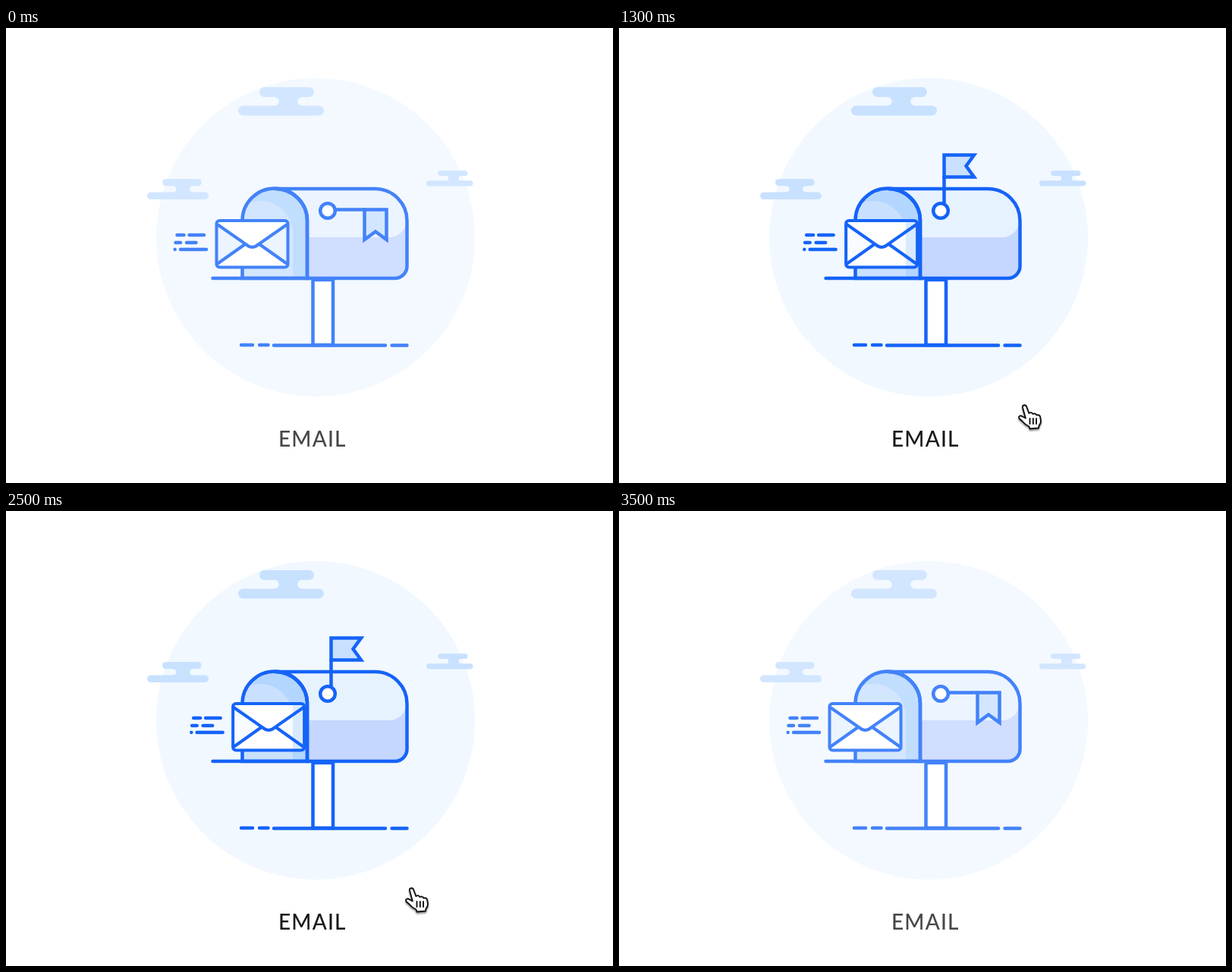
Animation of 800 by 600 pixels, one loop 3550 ms. Source, as an HTML page:

```html
<!DOCTYPE html>
<html lang="en">
<head>
<meta charset="utf-8">
<title>Email</title>
<style>
  html, body { margin: 0; width: 100%; height: 100%; overflow: hidden; background: #fff; }
  svg { display: block; width: 800px; height: 600px; }
  .line { fill: none; stroke: #1563f8; stroke-width: 4.5; }
  .round { stroke-linecap: round; }
  .thin { stroke-width: 4; }
  .cloud { fill: #c8e1ff; }
  .white { fill: #fff; }
  .tint { fill: #e7f2ff; }
  text { font: 500 28px Lato, sans-serif; letter-spacing: 1.2px; fill: #1a1a1a; }
  #cursor { filter: drop-shadow(0 2px 1px rgba(0, 0, 0, .45)); }
  #cursor path { fill: #fff; stroke: #111; stroke-width: 1.9; stroke-linejoin: round; stroke-linecap: round; }
</style>
</head>
<body>
<svg viewBox="0 0 800 600">
  <defs>
    <g id="cloud">
      <rect x="28" width="72" height="13" rx="6.5"/>
      <rect y="24.5" width="113" height="13" rx="6.5"/>
      <path d="M48 12.5V13a5.75 5.75 0 0 1 0 11.5v.5H84v-.5a5.75 5.75 0 0 1 0-11.5v-.5z"/>
    </g>
    <path id="door" d="M311.5 330V254a42.75 42.5 0 0 1 85.5 0V330z"/>
    <path id="body" d="M354 212H486.500a42 42 0 0 1 42 42V314a16 16 0 0 1 -16 16H397V254a43 42 0 0 0 -43-42z"/>
    <clipPath id="doorClip"><use href="#door"/></clipPath>
    <clipPath id="bodyClip"><use href="#body"/></clipPath>
  </defs>

  <g id="scene">
    <circle cx="408" cy="276" r="210" fill="#f1f8ff"/>
    <g class="cloud">
      <use href="#cloud" transform="translate(306 78)"/>
      <use href="#cloud" transform="translate(186 199) scale(.717)"/>
      <use href="#cloud" transform="translate(554 188) scale(.544)"/>
    </g>

    <!-- post and ground -->
    <path class="line round" d="M310 418H325M334 418H345.500M353 418.500H500M508.500 418.500H528.500"/>
    <rect class="line white" style="fill:#fff" x="404.500" y="332" width="26.500" height="86"/>

    <!-- mailbox -->
    <use href="#body" fill="#c5d7ff"/>
    <path class="tint" clip-path="url(#bodyClip)" d="M340 200H528V253a23 23 0 0 1 -23 23H340z"/>
    <use href="#door" fill="#b2d6ff"/>
    <circle cx="335" cy="271" r="43" fill="#c9e1ff" clip-path="url(#doorClip)"/>
    <rect x="311" y="271" width="67" height="59" fill="#c9e1ff"/>
    <use href="#body" class="line"/>
    <use href="#door" class="line"/>
    <path class="line round" d="M272.500 330H400"/>

    <!-- flag -->
    <g id="flag" class="line">
      <path d="M429 239.500H474"/>
      <path fill="#c9e1ff" d="M472.500 239.500H501.500V279L487 268.500L472.500 279z"/>
    </g>
    <circle class="line" style="fill:#fff" cx="424" cy="241" r="9.800"/>

    <!-- letter -->
    <g id="letter">
      <path class="line round" d="M225.500 273H234.500M241.500 273H261M223.500 283H230M238 283H250.500M222.700 292h.01M230 292H264"/>
      <rect class="white" x="277.500" y="254" width="94" height="61.500" rx="4"/>
      <path id="panes" class="tint" d="M279 260L315 285L279 311zM370.500 260L334.500 285L370.500 311z"/>
    </g>
    <rect id="shade" x="378" y="254" height="61.500" fill="#d9eaff"/>
    <g id="letterLines" class="line">
      <rect class="thin" x="277.500" y="254" width="94" height="61.500" rx="4"/>
      <path class="thin" d="M278.500 259L316 285Q324.500 293 333 285L370.500 259M278.500 311L314.500 285.500M370.500 311L334.500 285.500"/>
    </g>

    <text x="359" y="552">EMAIL</text>
  </g>

  <g id="cursor">
    <path d="M-3 3.500Q-3.500 .8-.8 .3Q1.500 .2 2.300 2.800L5.300 11Q8.500 8.800 10.500 12Q14 10.500 15.500 13.500Q19.500 12.300 20.300 16.500L21 21.500Q21 25 18.500 27.500L18 30.500L6.500 31.500L5.500 28.500Q0 26-3.500 21.500L-7.500 18Q-9 14.500-5 14.300L.8 17.500z"/>
    <path d="M6.500 18V25M10.800 18V25M15 18V25"/>
  </g>
</svg>

<script>
  const LOOP = 3550, STEP = 50;
  const ENTER = 750, LEAVE = 3200;
  const SLIDE = 22, SLIDE_PERIOD = 1200;
  const $ = id => document.getElementById(id);
  const clamp = x => Math.min(1, Math.max(0, x));

  // Progress of a hover transition, 0 at rest and 1 when hovered.
  function hover(t, duration, ease = x => x) {
    return t < LEAVE
      ? ease(clamp((t - ENTER) / duration))
      : 1 - ease(clamp((t - LEAVE) / duration));
  }

  function cursorAt(t) {
    const arriving = (Math.max(0, 900 - t) / 150) ** 2;
    const leaving = (Math.max(0, t - 3000) / 150) ** 2;
    return [535 + 22 * arriving + 48 * leaving, 497 + 60 * arriving + 102 * leaving];
  }

  function draw(t) {
    $('scene').setAttribute('opacity', 0.8 + 0.2 * hover(t, 200));

    const angle = -90 * hover(t, 300, x => x ** 1.5);
    $('flag').setAttribute('transform', `rotate(${angle} 429 240)`);

    const hovered = t >= ENTER && t < LEAVE;
    const wave = hovered ? Math.sin(Math.PI * (t - ENTER) / SLIDE_PERIOD) ** 2 : 0;
    const dx = SLIDE * wave;
    for (const id of ['letter', 'letterLines']) $(id).setAttribute('transform', `translate(${dx} 0)`);
    $('panes').setAttribute('opacity', 1 - 0.7 * wave);
    $('shade').setAttribute('width', Math.max(0, 371.5 + dx - 378));

    $('cursor').setAttribute('transform', `translate(${cursorAt(t)})`);
    $('cursor').style.visibility = t >= ENTER && t < LEAVE ? 'visible' : 'hidden';
  }

  const start = performance.now();
  function tick() {
    const t = (performance.now() - start) % LOOP;
    draw(Math.floor(t / STEP) * STEP);
    requestAnimationFrame(tick);
  }
  tick();
</script>
</body>
</html>
```
